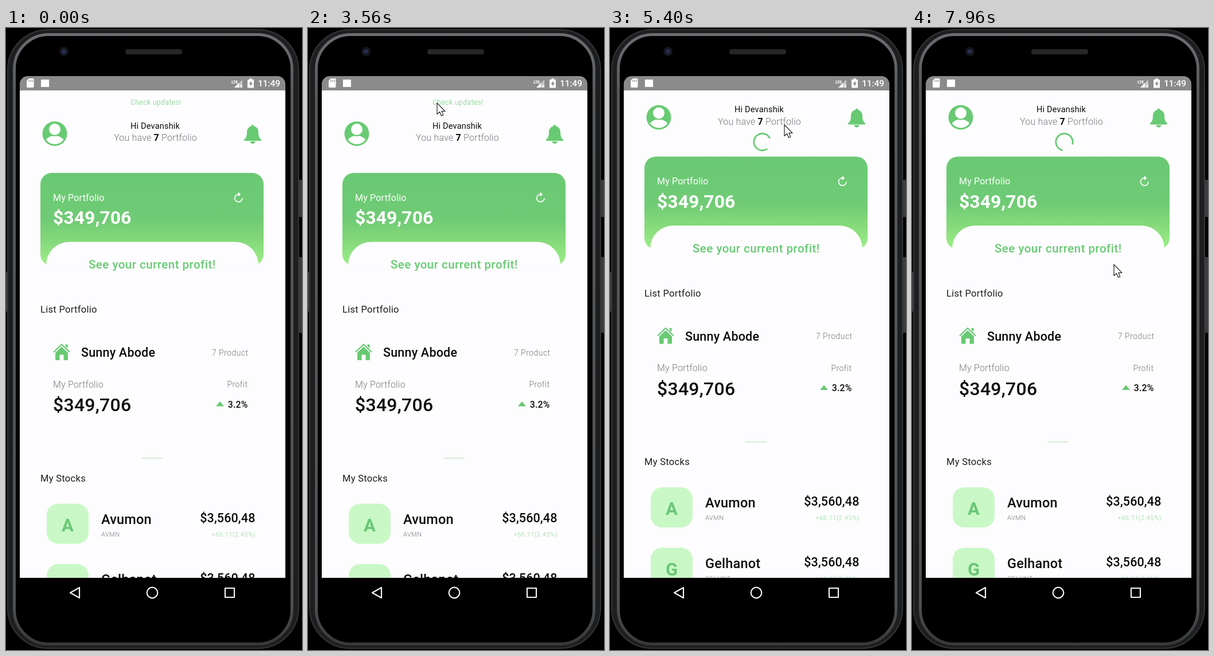
Recreate the animation shown at these times as an HTML page. Size 516x1086 px, loop 8 s.

```html
<!DOCTYPE html>
<html lang="en">
<head>
<meta charset="utf-8">
<title>Portfolio app</title>
<style>
  html, body { margin: 0; width: 100%; height: 100%; overflow: hidden; background: #000; }
  svg { display: block; width: 516px; height: 1086px; }
  text { font-family: Roboto, "Noto Sans", sans-serif; fill: #0b0b0d; white-space: pre; }
  .end { text-anchor: end; }
  .mid { text-anchor: middle; }
  .head { font-size: 16.5px; letter-spacing: .3px; fill: #1d1d20; }
  .label { font-size: 16px; letter-spacing: .2px; }
  .light { font-weight: 300; fill: #77777c; }
  .small { font-size: 14px; letter-spacing: .45px; }
  .sum { font-size: 32px; font-weight: 500; letter-spacing: .25px; }
  .name { font-size: 23.5px; font-weight: 500; letter-spacing: .2px; }
  .price { font-size: 21.5px; font-weight: 500; letter-spacing: .15px; }
  .tiny { font-size: 11px; font-weight: 300; letter-spacing: .55px; }
  .letter { font-size: 31px; font-weight: 700; fill: #6bc676; }
  .green { fill: #68ca73; }
  .pale { fill: #8fdc96; }
  .white { fill: #fff; }
</style>
</head>
<body>
<svg viewBox="0 0 516 1086" xmlns="http://www.w3.org/2000/svg">
  <defs>
    <linearGradient id="card" x1="0" y1="0" x2="0" y2="1">
      <stop offset="0" stop-color="#6ac973"/>
      <stop offset=".5" stop-color="#6fcb75"/>
      <stop offset=".72" stop-color="#84d87a"/>
      <stop offset="1" stop-color="#9cee88"/>
    </linearGradient>
    <linearGradient id="rim" x1="0" y1="0" x2="0" y2="1">
      <stop offset="0" stop-color="#6c6d71"/>
      <stop offset=".1" stop-color="#565759"/>
      <stop offset=".93" stop-color="#505153"/>
      <stop offset="1" stop-color="#38393b"/>
    </linearGradient>
    <clipPath id="page"><rect x="24" y="109" width="463" height="851"/></clipPath>
    <clipPath id="face"><circle cx="85" cy="156" r="18.500"/></clipPath>
  </defs>

  <!-- phone body -->
  <rect width="516" height="1086" fill="#000"/>
  <g fill="#3d3d40">
    <rect x="511" y="265" width="5" height="65"/>
    <rect x="511" y="400" width="5" height="132"/>
    <rect x="0" y="426" width="2" height="69"/>
  </g>
  <rect x="3" y="3" width="507" height="1080" rx="70" fill="#1d1e1f" stroke="#343537" stroke-width="2"/>
  <rect x="14.500" y="11.500" width="484" height="1064" rx="60" fill="#000" stroke="url(#rim)" stroke-width="5"/>
  <circle cx="101" cy="41" r="8" fill="#14151d"/>
  <circle cx="101" cy="41" r="4" fill="#272d4b"/>
  <rect x="208" y="37" width="99" height="9" rx="4" fill="#262627"/>

  <!-- screen -->
  <path d="M24 109V98a14 14 0 0 1 14-14H473a14 14 0 0 1 14 14V109Z" fill="#8b8b8c"/>
  <rect x="24" y="109" width="463" height="851" fill="#fdfcfe"/>
  <g fill="#fff">
    <path d="M40 88H47a1.5 1.5 0 0 1 1.5 1.5V102.5a1.5 1.5 0 0 1-1.5 1.5H37.5a1.5 1.5 0 0 1-1.5-1.5V92Z"/>
    <path d="M40 91v3M43 91v3M46 91v3" stroke="#8b8b8c" stroke-width="1.3"/>
    <rect x="61" y="90" width="14" height="13"/>
    <path d="M412 90V104H398Z" opacity=".5"/>
    <path d="M406 96V104H398Z"/>
    <path d="M408 99l4 5M412 99l-4 5" stroke="#fff" stroke-width="1.2"/>
    <path d="M424.5 90V88h4v2H432V104.5H421V90Z"/>
    <path d="M427.5 92l-4 6h2.5v4l4-6h-2.5Z" fill="#8b8b8c"/>
  </g>
  <text x="393" y="97" class="white" font-size="8" font-weight="700" letter-spacing="-.8">LTE</text>
  <text x="478" y="102" class="white end" font-size="15.3" font-weight="500">11:49</text>

  <g clip-path="url(#page)">
    <text id="check" x="217" y="134" class="green" font-size="12" font-weight="300" letter-spacing=".55">Check updates!</text>

    <g id="content">
      <circle cx="85" cy="156" r="21.5" class="green"/>
      <g clip-path="url(#face)" class="white">
        <ellipse cx="85" cy="174" rx="18" ry="14.500"/>
        <circle cx="85" cy="148.5" r="11" stroke="#68ca73" stroke-width="2"/>
      </g>
      <text x="217" y="147" font-size="14.5" letter-spacing=".2">Hi Devanshik</text>
      <text x="188" y="168.5" class="label light">You have <tspan font-weight="700" fill="#0b0b0d">7</tspan> Portfolio</text>
      <path class="green" d="M430 140.500c1.500 0 2.300 1 2.300 2.600c5 1.200 7.700 5 7.700 10.400c0 7 1.500 10 4.600 12.500c1 1 .4 2.500-1 2.500H416.400c-1.400 0-2-1.500-1-2.500c3.100-2.500 4.600-5.500 4.600-12.500c0-5.400 2.700-9.200 7.700-10.400c0-1.600 .8-2.600 2.300-2.600ZM425.500 169.500h9a4.500 4 0 0 1-9 0Z"/>

      <rect x="60" y="224.5" width="389" height="162" rx="20" fill="url(#card)"/>
      <path d="M70 395V385a40 40 0 0 1 40-40H400a40 40 0 0 1 40 40V395Z" fill="#fdfcfe"/>
      <text x="82" y="273" class="label white">My Portfolio</text>
      <text x="82" y="313.5" class="sum white" style="font-weight:700;letter-spacing:0">$349,706</text>
      <path d="M412 268.500A6.700 6.700 0 1 1 405.300 261.800" fill="none" stroke="#fff" stroke-width="1.800"/>
      <path d="M404.800 257.800L409.300 261.900L404.800 266Z" class="white"/>
      <text x="144" y="391.5" class="green" font-size="20.5" font-weight="500" letter-spacing=".48">See your current profit!</text>

      <text x="60" y="468.5" class="head">List Portfolio</text>
      <g class="green">
        <path d="M97 528L108 538.5V550a1.5 1.5 0 0 1-1.5 1.5H100.5V542h-7v9.5H87.5a1.5 1.5 0 0 1-1.5-1.5V538.5Z"/>
        <path d="M103.5 524H107.5V531L103.5 527Z"/>
        <path d="M83 537.5L97 524L111 537.5" fill="none" stroke="#68ca73" stroke-width="2.2" stroke-linejoin="round"/>
      </g>
      <text x="131" y="545.5" font-size="21.5" font-weight="500" letter-spacing=".2">Sunny Abode</text>
      <text x="422.5" y="543" class="small light end">7 Product</text>
      <text x="82" y="599" class="label light">My Portfolio</text>
      <text x="421.5" y="598.5" class="small light end">Profit</text>
      <text x="82" y="640.5" class="sum">$349,706</text>
      <path d="M366 632L373 623.5L380 632Z" class="green"/>
      <text x="421.5" y="634" class="end" font-size="15.8" font-weight="500" letter-spacing=".2">3.2%</text>

      <rect x="236" y="722" width="37" height="1.2" fill="#bfe0ba"/>
      <text x="60" y="763" class="head">My Stocks</text>
      <g id="stocks"></g>
    </g>

    <circle id="loader" cx="265.5" cy="199" r="14.7" pathLength="360" fill="none" stroke="#68ca73" stroke-width="2.8" stroke-linecap="square"/>
  </g>

  <!-- navigation bar -->
  <g fill="none" stroke="#f4f4f4" stroke-width="2.2" stroke-linejoin="round">
    <path d="M128 977V995L112 986Z"/>
    <circle cx="255" cy="986" r="9.3"/>
    <rect x="382" y="978" width="16" height="16"/>
  </g>

  <path id="mouse" d="M0 0V19.5L4.5 15.5L7.6 22.5L10.8 21L7.8 14.3H14Z" fill="#fff" stroke="#222226" stroke-width="1.2" stroke-linejoin="round"/>
</svg>
<script>
const LOOP = 8000, TAP = 4700, SPIN_FROM = 4750, DROP = 28.5;
const $ = id => document.getElementById(id);

const stocks = [["A", "Avumon", "AVMN"], ["G", "Gelhanot", "GELHNT"]];
$("stocks").innerHTML = stocks.map(([letter, name, code], i) => `
  <g transform="translate(0 ${i * 105.5})">
    <rect x="71" y="802" width="73" height="70" rx="20" fill="#c9f8c6"/>
    <text x="107.5" y="850" class="letter mid">${letter}</text>
    <text x="166" y="837" class="name">${name}</text>
    <text x="166" y="859" class="tiny light">${code}</text>
    <text x="434.5" y="834" class="price end">$3,560,48</text>
    <text x="435" y="859" class="tiny pale end">+66.11(2.45%)</text>
  </g>`).join("");

// time, x, y of the pointer tip
const path = [
  [1600, 518, 268], [1800, 485, 243], [2200, 420, 200], [2930, 420, 200],
  [3260, 228, 148], [3460, 228, 148], [3560, 225, 131], [4230, 245, 128],
  [4700, 245, 128], [5400, 304, 169], [6400, 315, 195], [7960, 352, 413]
];

const clamp = v => Math.min(1, Math.max(0, v));

function pointAt(t) {
  const i = path.findIndex(p => p[0] > t);
  if (i < 0) return path[path.length - 1].slice(1);
  if (i === 0) return path[0].slice(1);
  const [t0, x0, y0] = path[i - 1], [t1, x1, y1] = path[i];
  const k = (t - t0) / (t1 - t0);
  return [x0 + (x1 - x0) * k, y0 + (y1 - y0) * k];
}

// cubic-bezier(.4, 0, .2, 1)
function ease(x) {
  let lo = 0, hi = 1, s = .5;
  for (let i = 0; i < 18; i++) {
    s = (lo + hi) / 2;
    const bx = 1.2 * s * (1 - s) ** 2 + .6 * s * s * (1 - s) + s ** 3;
    if (bx < x) lo = s; else hi = s;
  }
  return 3 * s * s * (1 - s) + s ** 3;
}

function spin(ms) {
  const phase = ms / 1333 % 1;
  const head = ease(clamp(phase * 2)) * 270;
  const tail = ease(clamp(phase * 2 - 1)) * 270;
  const start = tail - 90 + ms / 2222 % 1 * 360 + phase * 90;
  const sweep = Math.max(head - tail, .1);
  $("loader").setAttribute("stroke-dasharray", `${sweep} ${360 - sweep}`);
  $("loader").setAttribute("transform", `rotate(${start} 265.5 199)`);
}

function draw(t) {
  const tapped = t >= TAP;
  $("content").setAttribute("transform", `translate(0 ${tapped ? 0 : DROP})`);
  $("check").style.opacity = tapped ? 0 : 1 - .6 * clamp((t - 4400) / 100);
  $("loader").style.display = t >= SPIN_FROM ? "" : "none";
  if (t >= SPIN_FROM) spin(t - SPIN_FROM);
  $("mouse").style.display = t >= path[0][0] ? "" : "none";
  $("mouse").setAttribute("transform", `translate(${pointAt(t)})`);
}

const began = performance.now();
function tick() {
  draw((performance.now() - began) % LOOP);
  requestAnimationFrame(tick);
}
tick();
</script>
</body>
</html>
```
